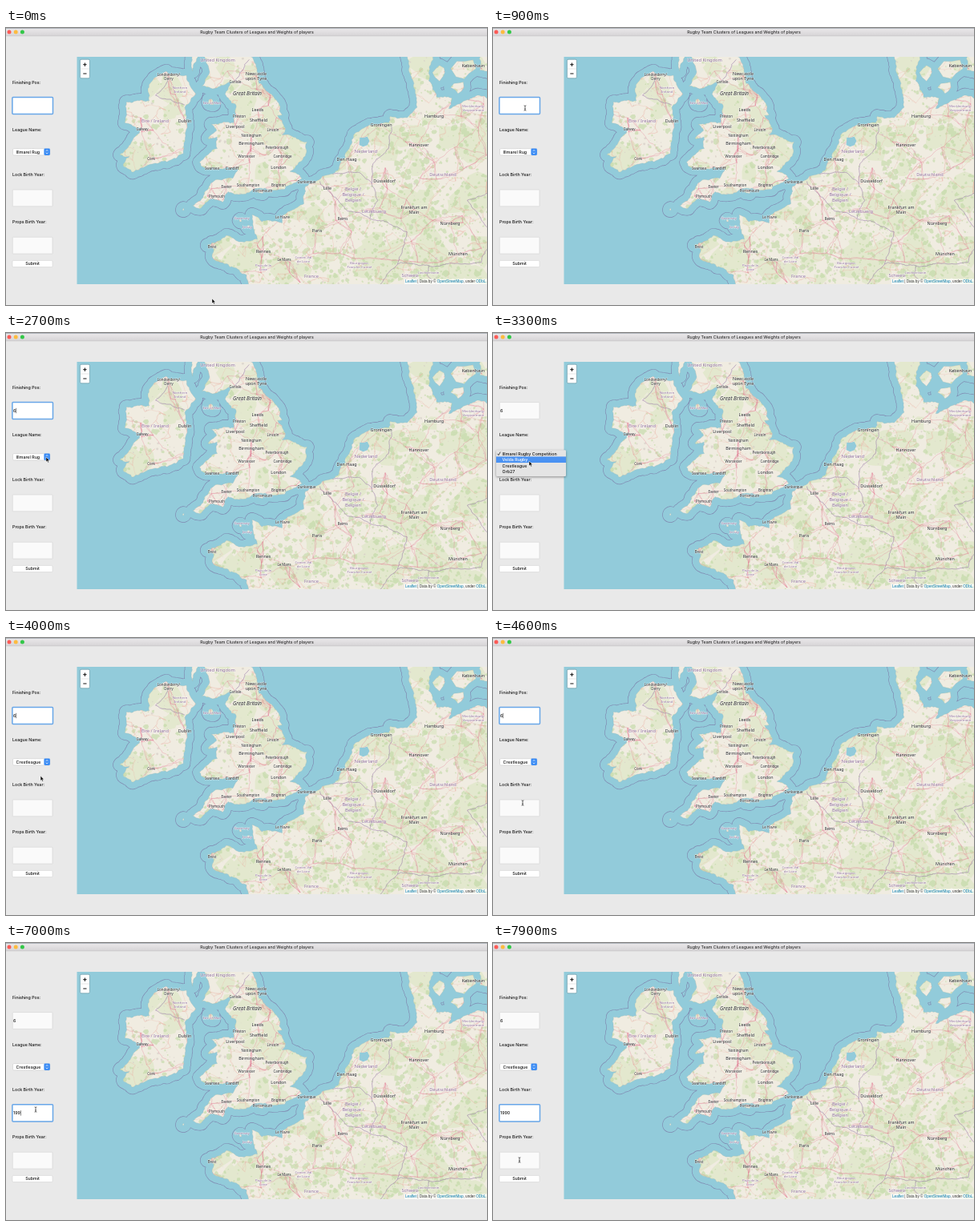
Write an HTML page that moves like this. It is 600 by 346 pixels and loops after 8000 ms.

```html
<!DOCTYPE html>
<html lang="en">
<head>
<meta charset="utf-8">
<title>Rugby Team Clusters</title>
<style>
html, body { margin: 0; width: 100%; height: 100%; overflow: hidden; background: #e9e9e9; }
svg { display: block; width: 600px; height: 346px; }
.ui { font: 500 5.3px Inter, "Liberation Sans", sans-serif; fill: #151515; }
.town, .region { font-family: "Noto Sans", "Open Sans", sans-serif; text-anchor: middle;
  paint-order: stroke; stroke: #fffb; stroke-width: .8px; stroke-linejoin: round; }
.town { fill: #222; }
.region { fill: #8c6a96; }
.credit { font: 4.65px "Liberation Sans", sans-serif; fill: #333; }
.menu { filter: drop-shadow(0 1px 1.6px #0006); }
</style>
</head>
<body>
<svg id="stage" viewBox="0 0 600 346" xmlns="http://www.w3.org/2000/svg"></svg>
<script>
const LOOP = 8000, STEP = 100;
const SEA = '#92cbda', LAND = '#f0ece1', PURPLE = '#9879a8';
const stage = document.getElementById('stage');

function el(tag, attrs, parent = stage, text) {
  const node = document.createElementNS('http://www.w3.org/2000/svg', tag);
  set(node, attrs);
  if (text !== undefined) node.textContent = text;
  return parent.appendChild(node);
}
function set(node, attrs) { for (const key in attrs) node.setAttribute(key, attrs[key]); }
const show = (node, on) => node.setAttribute('visibility', on ? 'visible' : 'hidden');
const rect = (x, y, width, height, fill, parent, more) =>
  el('rect', { x, y, width, height, fill, ...more }, parent);
const label = (x, y, text, more, parent) => el('text', { x, y, class: 'ui', ...more }, parent, text);

let seed = 7;
function rnd() {
  seed = (seed * 1664525 + 1013904223) % 4294967296;
  return seed / 4294967296;
}
const spread = size => (rnd() - .5) * 2 * size;
const path = (points, end = '') => 'M' + points.map(p => p.map(v => v.toFixed(1)).join(' ')).join('L') + end;
const dist = (a, b) => Math.hypot(b[0] - a[0], b[1] - a[1]);

// Mercator
const project = (lon, lat) => [
  342.5 + 19.25 * lon,
  1339 - 1103 * Math.log(Math.tan((45 + lat / 2) * Math.PI / 180))
];

// Splits a segment by displaced midpoints until the pieces are short
function roughen(a, b, amount) {
  const d = dist(a, b);
  if (d < 3 || d > 150) return [a];
  const w = Math.min(1.7, d * amount);
  const mid = [(a[0] + b[0]) / 2 + spread(w), (a[1] + b[1]) / 2 + spread(w)];
  return [...roughen(a, mid, amount), ...roughen(mid, b, amount)];
}
function geo(list, amount, closed) {
  const n = list.trim().split(/\s+/).map(Number), points = [];
  for (let i = 0; i < n.length; i += 2) points.push(project(n[i], n[i + 1]));
  const stops = closed ? [...points, points[0]] : points;
  const rough = stops.slice(1).flatMap((p, i) => roughen(stops[i], p, amount));
  return closed ? path(rough, 'Z') : path([...rough, stops.at(-1)]);
}
function blob([x, y], r) {
  const ring = Array.from({ length: 8 }, (_, i) => {
    const s = r * (.65 + rnd() * .7), a = i * Math.PI / 4;
    return [x + s * Math.cos(a), y + s * Math.sin(a)];
  });
  return path(ring, 'Z');
}

const coasts = {
  ireland: `-7.4 55.35 -6.1 55.2 -5.5 54.5 -6.2 54 -6.05 53.3 -6.3 52.2 -8 51.8 -9.6 51.45 -10.2 51.75
    -9.8 52.1 -10.4 52.15 -9.7 52.6 -8.95 53.2 -10.1 53.4 -10 54.2 -8.5 54.25 -8.6 54.7 -8.2 55.1`,
  britain: `-5.7 56.2 -5.7 55.35 -5.3 56.1 -4.85 55.8 -4.65 55.45 -5.1 54.8 -4.4 54.7 -3.1 54.97 -3.6 54.5
    -2.9 54.1 -3.05 53.4 -4.5 53.35 -4.15 53.1 -4.7 52.8 -4.1 52.85 -4.1 52.4 -5.25 51.85 -4.9 51.62 -4 51.58
    -2.75 51.58 -3.1 51.2 -4.2 51.15 -5 50.5 -5.7 50.08 -5.15 49.97 -4.6 50.33 -3.75 50.22 -3.4 50.65
    -2.45 50.55 -1.4 50.8 .25 50.75 1.4 51.2 .6 51.48 1.6 52.1 1.72 52.65 .45 52.95 .1 52.93 .3 53.2
    -.2 53.68 .1 53.7 -.1 54.12 -.6 54.5 -1.4 54.9 -1.6 55.6 -2.2 56.2`,
  continent: `-1.8 46 -2.2 47.1 -4.4 47.85 -4.35 48.25 -4.75 48.4 -3.5 48.82 -2.7 48.55 -1.5 48.65 -1.85 49.7
    -1.2 49.4 .1 49.35 .2 49.7 1.5 50.15 1.6 50.87 3.5 51.42 4.2 52.05 4.75 52.95 5.4 53.2 7 53.4 7.1 53.65
    8.2 53.6 8.85 54 8.65 54.9 8.15 56.3 9.9 56.3 9.6 55 10.1 54.4 11.1 54.35 10.9 53.95 12.9 54.45 15 54 15 46`,
  sweden: '13 56.3 12.9 55.4 15 55.4 15 56.3'
};
// lon, lat, radius
const islands = [[-4.5, 54.2, 3.5], [-1.3, 50.67, 3], [-6.3, 49.92, 1], [-2.1, 49.2, 1.5], [-2.6, 49.45, 1.2],
  [10.3, 55.3, 9], [11.9, 55.45, 13], [11.5, 54.75, 7]];
const borders = ['-7.3 55.05 -8.1 54.45 -7.1 54.3 -6.2 54.08', '-3.05 54.98 -2.03 55.78',
  '2.55 51.08 4.15 49.97 6.35 49.45 8.2 48.97 7.58 47.58 6.1 46.3',
  '3.37 51.37 5 51.45 5.9 51 6 51.8 7 52.4 7.2 53.25', '5.9 51 6.3 50.3 5.8 49.55',
  '7.58 47.58 9.6 47.52 13 47.65 13.5 48.4', '9.6 47.5 9.5 47.1 10.5 46.4', '13.8 48.75 12.1 50.3 13.5 50.6'];

// Labels: "x,y text" around the middle, "~" breaks the line
const parse = list => list.split('|').map(item => {
  const [, x, y, text] = item.trim().match(/^(\d+),(\d+) (.*)$/);
  return { x: +x, y: +y, lines: text.split('~') };
});
const cities = parse(`312,60 Newcastle~upon Tyne|314,102 Leeds|315,115 Sheffield|286,123 Liverpool|
306,144 Birmingham|340,174 London|282,175 Cardiff|223,116 Dublin|388,253 Paris|321,279 Rennes|401,200 Lille|
425,164 Den Haag|468,121 Groningen|515,146 Hannover|534,110 Hamburg|472,191 Düsseldorf|
509,227 Frankfurt am~Main|554,244 Nürnberg|564,282 München|583,47 København`);
const towns = parse(`203,61 Londonderry/~Derry|286,67 Carlisle|291,110 Preston|333,127 Lincoln|
306,134 Nottingham|338,149 Peterborough|300,160 Worcester|345,160 Cambridge|257,175 Swansea|302,196 Southampton|
340,196 Brighton|320,203 Portsmouth|275,198 Exeter|263,210 Plymouth|375,192 Dunkerque|170,126 Galway|
181,163 Cork|257,273 Brest|345,236 Le Havre|420,238 Reims|347,289 Le Mans`);
const regions = parse(`217,77 Northern~Ireland|257,93 Isle of Man|294,237 Guernsey|301,248 Jersey|
321,299 Pays de la~Loire|371,289 Centre-Val~de Loire|441,296 Bourgogne-~Franche-Comté|
583,100 Mecklenburg-~Vorpommern|527,305 Liechtenstein`);
const countries = parse(`264,40 United Kingdom|186,116 Éire / Ireland|449,154 Nederland|545,183 Deutschland|
433,208 België /~Belgique /~Belgien|459,229 Lëtzebuerg|381,310 France|504,309 Schweiz`);

const scatter = count => Array.from({ length: count }, () => [88 + rnd() * 512, 36 + rnd() * 284]);
const patches = (count, min, max, share) => scatter(count)
  .filter(p => rnd() < share(p)).map(p => blob(p, min + rnd() * rnd() * (max - min))).join('');

// Winding roads from each point to its nearest neighbours
function roads(points, links, reach) {
  return points.flatMap(p => points.filter(q => dist(p, q) > 3 && dist(p, q) < reach)
    .sort((a, b) => dist(p, a) - dist(p, b)).slice(0, links)
    .map(q => path([...roughen(p, q, .12), q]))).join('');
}

function drawMap() {
  const defs = el('defs', {});
  rect(88.5, 36, 511.5, 284, '#000', el('clipPath', { id: 'frame' }, defs));
  const coast = Object.values(coasts).map(list => geo(list, .16, true)).join('') +
    islands.map(([lon, lat, r]) => blob(project(lon, lat), r)).join('');
  el('path', { d: coast }, el('clipPath', { id: 'land' }, defs));

  const map = el('g', { 'clip-path': 'url(#frame)' });
  rect(88, 36, 512, 284, SEA, map);
  const line = (d, stroke, width, parent = map, opacity = 1) =>
    el('path', { d, fill: 'none', stroke, 'stroke-width': width, 'stroke-linejoin': 'round', opacity }, parent);
  // Territorial waters: a wide outline covered by a narrower sea-coloured one
  line(coast, '#7f88b0', 18.2);
  line(coast, SEA, 16.9);
  el('path', { d: coast, fill: LAND }, map);

  const land = el('g', { 'clip-path': 'url(#land)' }, map);
  const fill = (d, color, opacity) => el('path', { d, fill: color, opacity }, land);
  const green = ([x, y]) => .35 + (y - 36) / 500 + (x > 380 ? .25 : 0);
  fill(patches(260, 8, 26, green), '#d3e3b6', .45);
  fill(patches(3000, .8, 4.5, green), '#bcd79f', .55);
  fill(patches(700, .5, 1.8, () => 1), '#d8cfc8', .7);
  line(roads(scatter(800), 2, 30), '#eaaa9c', .4, land, .6);
  const centres = [...cities, ...towns].map(({ x, y }) => [x, y]);
  line(roads([...centres, ...scatter(130)], 3, 60), '#e2748c', .5, land, .6);
  line(borders.map(list => geo(list, .12)).join(''), PURPLE, .7, land, .8);
  el('path', { d: blob(project(5.35, 52.7), 6), fill: SEA }, map);
  line(coast, '#93b3b2', .3);

  const write = (list, cls, size, more) => list.forEach(({ x, y, lines }) => lines.forEach((text, i) =>
    el('text', { x, y: y + size * (.36 + 1.15 * (i - (lines.length - 1) / 2)), class: cls, 'font-size': size, ...more },
      map, text)));
  write(regions, 'region', 4.3);
  write(towns, 'town', 4.4);
  write(countries, 'region', 5.7);
  write(cities, 'town', 5.4);
  write(parse('301,82 Great Britain'), 'town', 6.3, { 'font-style': 'italic' });

  rect(92.4, 39.2, 12, 23.6, '#fff', map, { rx: 1.6, stroke: '#6a9aa6', 'stroke-width': .7 });
  line('M92.8 51H104', '#ccc', .5);
  line('M96.2 45.7H100.6M98.4 43.5V47.9M96.3 57H100.5', '#111', 1);

  rect(497, 313.4, 103, 6.6, '#fff', map, { opacity: .75 });
  const credit = el('text', { x: 498, y: 318.4, class: 'credit' }, map);
  [['Leaflet', '#0078a8'], [' | Data by © '], ['OpenStreetMap', '#0078a8'], [', under '], ['ODbL.', '#0078a8']]
    .forEach(([text, color]) => el('tspan', color ? { fill: color } : {}, credit, text));
}

const leagues = ['Illmarel Rugby Competition', 'Velda Rugby', 'Crestleague', 'Orb27'];
const fieldTops = [86.6, 202, 261.2];

function drawWindow() {
  rect(0, 0, 600, 346, '#e9e9e9');
  const bar = el('linearGradient', { id: 'bar', x2: 0, y2: 1 }, el('defs', {}));
  el('stop', { 'stop-color': '#ebe9eb' }, bar);
  el('stop', { offset: 1, 'stop-color': '#d6d4d6' }, bar);
  rect(0, 0, 600, 10, 'url(#bar)');
  rect(0, 0, 600, .7, '#99a0a8');
  rect(0, 9.7, 600, .5, '#bdbbbd');
  ['#fc5b57', '#fdbb3f', '#33c748'].forEach((fill, i) => el('circle', { cx: 4 + 8.2 * i, cy: 5, r: 2.5, fill }));
  label(313, 7, 'Rugby Team Clusters of Leagues and Weights of players',
    { 'text-anchor': 'middle', style: 'font-weight:400' });
  [['Finishing Pos:', 69.7], ['League Name:', 128.7], ['Lock Birth Year:', 185], ['Props Birth Year:', 243.8]]
    .forEach(([text, y]) => label(8, y, text));
  rect(8, 290.4, 50, 8.2, '#fff', stage, { rx: 1.4, stroke: '#ccc', 'stroke-width': .5 });
  label(33, 296.4, 'Submit', { 'text-anchor': 'middle' });
}

drawWindow();
drawMap();

const fields = fieldTops.map(top => {
  rect(8.2, top, 49.8, 20.8, '#fafafa', stage, { rx: .6, stroke: '#d2d2d2', 'stroke-width': .6 });
  const ring = rect(7.9, top - .2, 50.6, 21.2, '#fff', stage, { rx: 1, stroke: '#68a6e8', 'stroke-width': 1.5 });
  return { top, ring, text: label(9, top + 12.4, '') };
});
const caret = rect(0, 0, .5, 6.4, '#111');

rect(8.5, 150.6, 46.3, 8.3, '#fff', stage, { rx: 1.4, stroke: '#c4c4c4', 'stroke-width': .5 });
const chosen = label(12.6, 156.7, '');
rect(47.4, 150.6, 7.5, 8.3, '#3b8cf4', stage, { rx: 1.4 });
el('path', { d: 'M49.8 153.9L51.1 152.4L52.4 153.9M49.8 155.6L51.1 157.1L52.4 155.6',
  fill: 'none', stroke: '#fff', 'stroke-width': .7 });

const ROW = 7.6;
const menu = el('g', { class: 'menu' });
rect(4, 146.2, 87, 32.8, '#e4e4e4', menu, { rx: 1.2 });
const hover = rect(4, 0, 87, ROW, '#4a92f2', menu);
const options = leagues.map((name, i) => label(11.6, 152.6 + ROW * i, name, {}, menu));
const check = el('path', { d: 'M5.6 150.8L6.9 152.6L9.2 148.6', fill: 'none', 'stroke-width': .8 }, menu);

const arrow = el('path', { d: 'M0 0V6L1.4 4.8L2.4 7L3.4 6.5L2.5 4.4H4.3Z',
  fill: '#000', stroke: '#fff', 'stroke-width': .5 });
const beam = el('path', { d: 'M-1.4 -3.2Q0 -3.2 0 -2.4Q0 -3.2 1.4 -3.2M0 -2.6V2.6M-1.4 3.2Q0 3.2 0 2.4Q0 3.2 1.4 3.2M-.8 .9H.8',
  fill: 'none', stroke: '#111', 'stroke-width': .6 });

const MENU_OPEN = 2800, MENU_CLOSE = 3800, LOCK_CLICK = 5200;
// Pointer moves: from, to, x, y
const moves = [[300, 800, 40, 100], [2100, 2600, 50, 155], [2900, 3200, 45, 160], [3450, 3650, 44, 167],
  [3850, 4500, 37, 206], [4600, LOCK_CLICK, 37, 208], [7200, 7800, 33, 271]];
// Key presses: time, field, character
const keys = [[1700, 0, '6'], [6000, 1, '1'], [6500, 1, '9'], [6800, 1, '9'], [7200, 1, '0']];
const blinkStarts = [-500, MENU_CLOSE, LOCK_CLICK, ...keys.map(k => k[0])];

function pointerAt(t) {
  return moves.reduce(([px, py], [from, to, x, y]) => {
    const u = Math.max(0, Math.min(1, (t - from) / (to - from))), s = u * u * (3 - 2 * u);
    return [px + (x - px) * s, py + (y - py) * s];
  }, [257, 338]);
}

function render(t) {
  const [x, y] = pointerAt(t);
  const open = t >= MENU_OPEN && t < MENU_CLOSE;
  const focus = open ? -1 : t < LOCK_CLICK ? 0 : 1;

  fields.forEach((field, i) => {
    show(field.ring, i === focus);
    field.text.textContent = keys.filter(k => k[1] === i && k[0] <= t).map(k => k[2]).join('');
  });
  const since = t - Math.max(...blinkStarts.filter(time => time <= t));
  show(caret, focus >= 0 && since % 800 < 400);
  if (focus >= 0) {
    const { text, top } = fields[focus];
    set(caret, { x: 9.2 + (text.textContent ? text.getComputedTextLength() : 0), y: top + 7.2 });
  }

  chosen.textContent = leagues[t < MENU_CLOSE ? 0 : 2].slice(0, 12);
  menu.setAttribute('display', open ? 'inline' : 'none');
  const over = Math.max(0, Math.min(3, Math.floor((y - 146.6) / ROW)));
  hover.setAttribute('y', 146.8 + ROW * over);
  options.forEach((option, i) => { option.style.fill = i === over ? '#fff' : '#151515'; });
  check.setAttribute('stroke', over ? '#222' : '#fff');

  const inField = x > 8 && x < 58 && fieldTops.some(top => y > top && y < top + 21);
  show(beam, inField);
  show(arrow, !inField);
  set(inField ? beam : arrow, { transform: `translate(${x} ${y})` });
}

const start = performance.now();
function tick() {
  const t = (performance.now() - start) % LOOP;
  render(Math.floor(t / STEP) * STEP);
  requestAnimationFrame(tick);
}
tick();
</script>
</body>
</html>
```
